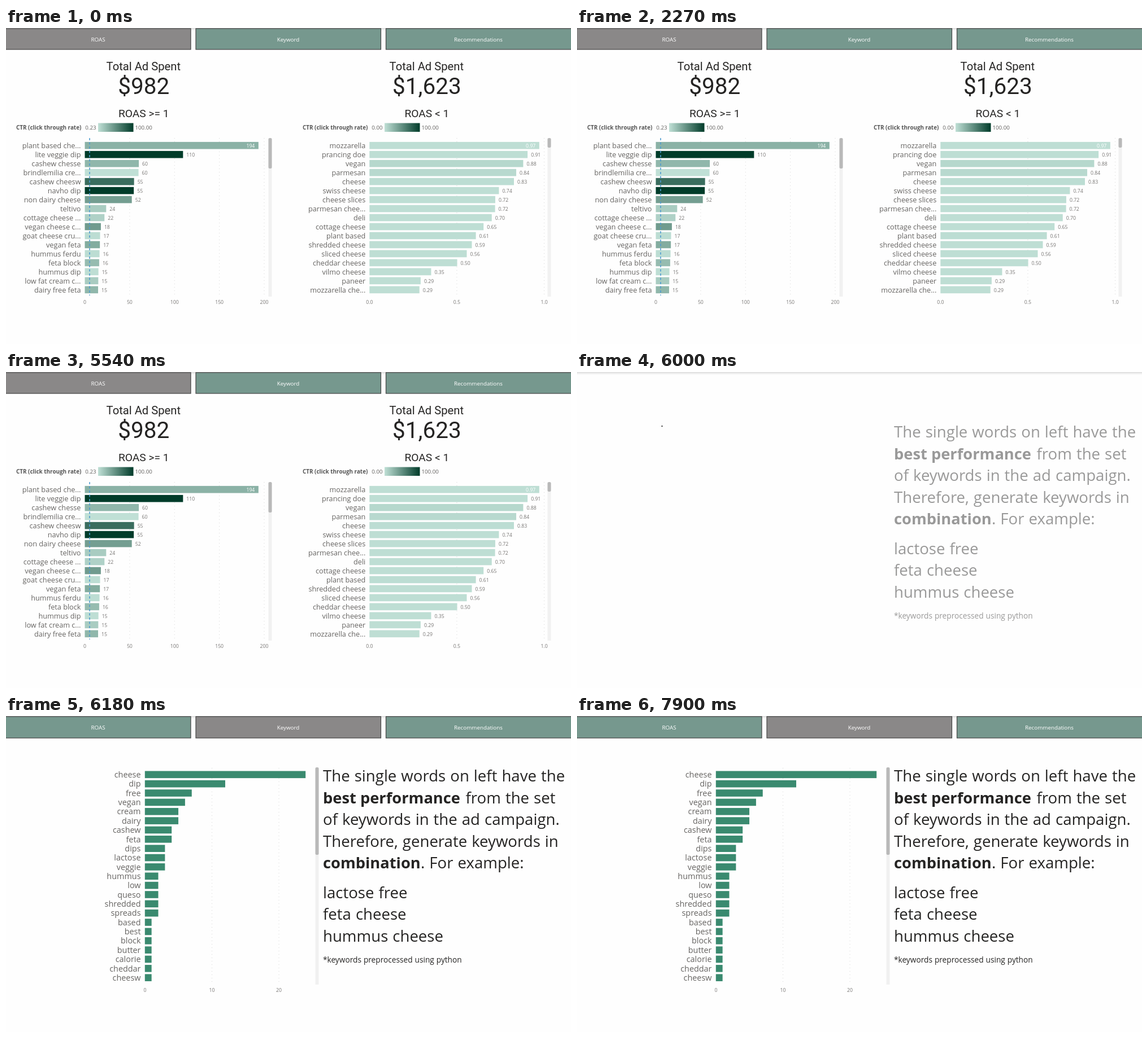
These frames come from a looping animation (1000x560 px, 8000 ms). An HTML page:

```html
<!DOCTYPE html>
<html lang="en">
<head>
<meta charset="utf-8">
<title>Ad keyword report</title>
<style>
  html, body { margin: 0; width: 100%; height: 100%; overflow: hidden; background: #fefefe; }
  svg { display: block; width: 100%; height: 100%; }
  text { font-family: "Open Sans", "Noto Sans", sans-serif; white-space: pre; }
  .title { font: 20.2px Roboto, sans-serif; fill: #252423; }
  .total { font: 40.5px Roboto, sans-serif; fill: #252423; }
  .sub { font: 19.2px Roboto, sans-serif; fill: #252423; }
  .tab { font-size: 9.8px; fill: #fff; }
  .legend { font-size: 9.7px; fill: #605e5c; }
  .bold { font-size: 9.9px; font-weight: 700; fill: #555; }
  .name { font-size: 12.7px; fill: #666462; }
  .word { font-size: 14.4px; fill: #666462; }
  .value, .axis { font-size: 8.7px; fill: #777573; }
  .inside { fill: #fff; }
  .body { font-size: 27.6px; word-spacing: .03em; fill: #252423; }
  .strong { font-size: 27.3px; font-weight: 700; fill: #252423; }
  .note { font-size: 13.7px; word-spacing: .03em; fill: #252423; }
  .grid { stroke: #d4d4d4; stroke-width: 1; stroke-dasharray: 1 5; }
  #roas, #words, #advice, #speck { animation: 8s step-end infinite; }
  #roas { animation-name: roas; }
  #words { animation-name: words; }
  #advice { animation-name: advice; }
  #speck { animation-name: speck; }
  /* page switch at 6000 ms, faded in over two 90 ms steps */
  @keyframes roas { 0% { opacity: 1 } 75%, 100% { opacity: 0 } }
  @keyframes words { 0% { opacity: 0 } 76.125% { opacity: .85 } 77.25%, 100% { opacity: 1 } }
  @keyframes advice { 0% { opacity: 0 } 75% { opacity: .46 } 76.125% { opacity: .85 } 77.25%, 100% { opacity: 1 } }
  @keyframes speck { 0% { opacity: 0 } 75% { opacity: 1 } 76.125%, 100% { opacity: 0 } }
</style>
</head>
<body>
<svg viewBox="0 0 1000 560" preserveAspectRatio="none">
  <defs>
    <linearGradient id="ramp"><stop stop-color="#c0e0d6"/><stop offset="1" stop-color="#013c2a"/></linearGradient>
    <linearGradient id="shade" x2="0" y2="1"><stop stop-color="#dcdcdc"/><stop offset="1" stop-color="#fefefe"/></linearGradient>
  </defs>
  <rect width="1000" height="560" fill="#fefefe"/>
  <rect width="1000" height="5" fill="url(#shade)"/>
  <g id="roas"></g>
  <g id="words"></g>
  <g id="advice"></g>
  <circle id="speck" cx="150.5" cy="96" r="1.2" fill="#444"/>
</svg>
<script>
const SVG = 'http://www.w3.org/2000/svg';
const page = id => document.getElementById(id);

function add(parent, tag, attrs, content = '') {
  const el = document.createElementNS(SVG, tag);
  for (const key in attrs) el.setAttribute(key, attrs[key]);
  el.textContent = content;
  parent.append(el);
}
const text = (parent, x, y, cls, content, anchor = 'start') =>
  add(parent, 'text', { x, y, class: cls, 'text-anchor': anchor }, content);
const rect = (parent, x, y, width, height, fill, extra) =>
  add(parent, 'rect', { x, y, width, height, fill, ...extra });

function tabs(parent, active, bottom) {
  [['ROAS', -2, 327, 163], ['Keyword', 336, 663.5, 499.5], ['Recommendations', 672.5, 1002, 836]]
    .forEach(([label, left, right, middle], i) => {
      rect(parent, left, 1, right - left, bottom - 1, i === active ? '#8a8888' : '#76988e',
        { stroke: '#454545', 'stroke-width': 1.2 });
      text(parent, middle, 23.7, 'tab', label, 'middle');
    });
}

function scrollbar(parent, x, y, thumb) {
  rect(parent, x, y, 6, 476 - y, '#f1f1f1');
  rect(parent, x, y, 6, thumb, '#b9b9b9', { rx: 2.5 });
}

function axis(parent, x0, unit, top, ticks) {
  ticks.forEach((tick, i) => {
    const x = x0 + parseFloat(tick) * unit;
    if (i) add(parent, 'line', { x1: x, x2: x, y1: top, y2: 476, class: 'grid' });
    text(parent, x, 488.6, 'axis', tick, 'middle');
  });
}

const mix = t => `rgb(${[[192, 1], [224, 60], [214, 42]].map(([a, b]) => Math.round(a + (b - a) * t))})`;

function panel({ shift, middle, total, sub, low, x0, unit, ticks, digits, rows, bar, thumb }) {
  const g = page('roas');
  text(g, middle, 75, 'title', 'Total Ad Spent', 'middle');
  text(g, middle + .5, 117, 'total', total, 'middle');
  text(g, middle + .5, 158, 'sub', sub, 'middle');
  text(g, 18 + shift, 180, 'bold', 'CTR (click through rate)');
  text(g, 159.5 + shift, 180, 'legend', low, 'end');
  rect(g, 163 + shift, 168.5, 62.5, 15.5, 'url(#ramp)');
  text(g, 228.5 + shift, 180, 'legend', '100.00');
  axis(g, x0, unit, 195, ticks);
  rows.forEach(([name, value, tone], i) => {
    const y = 208.2 + i * 15.98, end = x0 + value * unit;
    text(g, x0 - 7, y + 4.8, 'name', name, 'end');
    rect(g, x0, y - 6.3, end - x0, 12.6, mix(tone));
    const label = value.toFixed(digits);
    if (i) text(g, end + 6, y + 3.8, 'value', label);
    else text(g, end - 6.5, y + 3.8, 'value inside', label, 'end');
  });
  scrollbar(g, bar, 195, thumb);
}

tabs(page('roas'), 0, 38);
panel({
  shift: 0, middle: 243.3, total: '$982', sub: 'ROAS >= 1', low: '0.23',
  x0: 139.5, unit: 1.5875, ticks: ['0', '50', '100', '150', '200'], digits: 0, bar: 464.5, thumb: 54,
  rows: [
    ['plant based che...', 193.6, .28], ['lite veggie dip', 109.5, 1], ['cashew chesse', 60.2, .25],
    ['brindlemilia cre...', 59.9, 0], ['cashew cheesw', 54.9, .7], ['navho dip', 54.6, 1],
    ['non dairy cheese', 52.4, .4], ['teltivo', 23.8, .12], ['cottage cheese ...', 21.9, .09],
    ['vegan cheese c...', 17.9, .42], ['goat cheese cru...', 17, .02], ['vegan feta', 16.8, .32],
    ['hummus ferdu', 16.4, .02], ['feta block', 16, .22], ['hummus dip', 15.2, .01],
    ['low fat cream c...', 15, .12], ['dairy free feta', 14.8, .25]
  ]
});
add(page('roas'), 'line', { x1: 148, x2: 148, y1: 195, y2: 474, stroke: '#4f9bd0',
  'stroke-width': 2, 'stroke-dasharray': '4 3.5', opacity: .8 });
panel({
  shift: 507, middle: 744.3, total: '$1,623', sub: 'ROAS < 1', low: '0.00',
  x0: 643.3, unit: 309.2, ticks: ['0.0', '0.5', '1.0'], digits: 2, bar: 958.5, thumb: 17,
  rows: [
    ['mozzarella', .972, .01], ['prancing doe', .905, .01], ['vegan', .88, .05], ['parmesan', .84, .04],
    ['cheese', .827, .02], ['swiss cheese', .741, .01], ['cheese slices', .72, .01],
    ['parmesan chee...', .719, .01], ['deli', .7, .01], ['cottage cheese', .653, .01],
    ['plant based', .609, .02], ['shredded cheese', .586, .01], ['sliced cheese', .557, .01],
    ['cheddar cheese', .502, .01], ['vilmo cheese', .353, .01], ['paneer', .293, .01],
    ['mozzarella che...', .286, .01]
  ]
});

const words = page('words');
tabs(words, 1, 39);
axis(words, 246, 11.85, 92, ['0', '10', '20']);
const counts = [24, 12, 7, 6, 5, 5, 4, 4, 3, 3, 3, 2, 2, 2, 2, 2];
('cheese dip free vegan cream dairy cashew feta dips lactose veggie hummus low queso shredded ' +
 'spreads based best block butter calorie cheddar cheesw').split(' ').forEach((word, i) => {
  const y = 103.8 + i * 16.36;
  text(words, 238.5, y + 5.2, 'word', word, 'end');
  rect(words, 245.8, y - 6.3, (counts[i] || 1) * 11.85, 12.6, '#3a8a6f');
});
scrollbar(words, 547.5, 91, 155);

const advice = page('advice');
[
  [561, 116, 'body', 'The single words on left have the'],
  [561, 154.5, 'strong', 'best performance'],
  [813.5, 154.5, 'body', 'from the set'],
  [561, 193, 'body', 'of keywords in the ad campaign.'],
  [561, 231.5, 'body', 'Therefore, generate keywords in'],
  [561, 270, 'strong', 'combination'],
  [734, 270, 'body', '. For example:'],
  [561, 323, 'body', 'lactose free'],
  [561, 361.3, 'body', 'feta cheese'],
  [561, 399.6, 'body', 'hummus cheese'],
  [561, 436.8, 'note', '*keywords preprocessed using python']
].forEach(line => text(advice, ...line));
</script>
</body>
</html>
```
